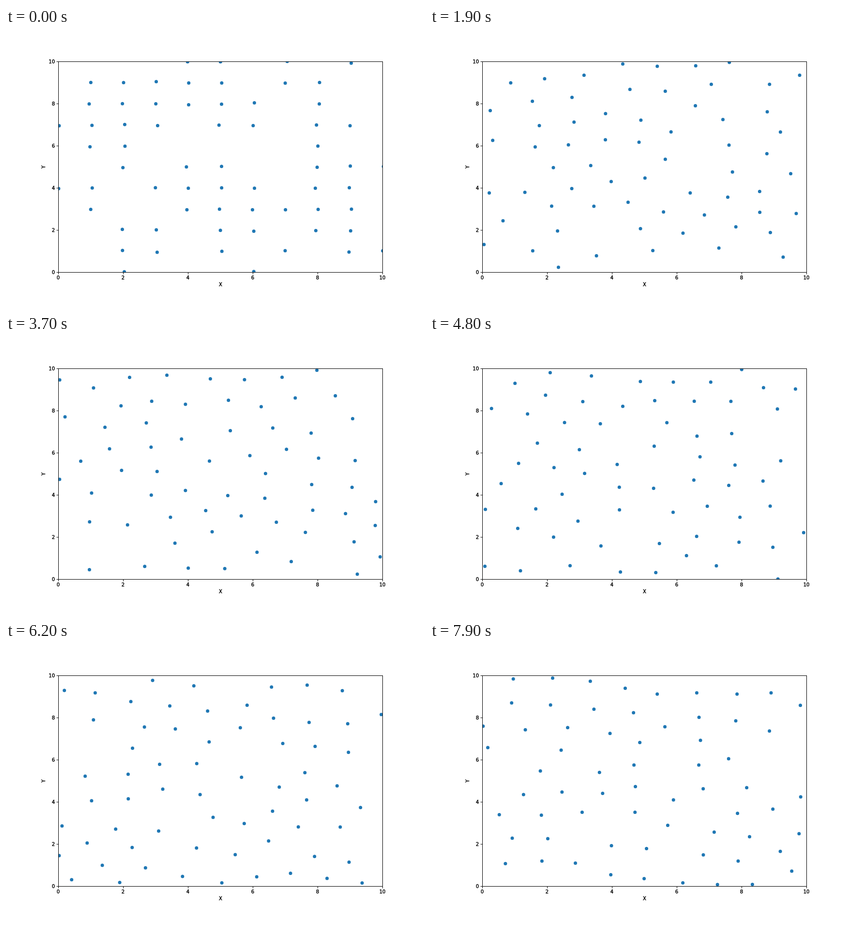
Animation, 864 px wide and 576 px high, one loop 8 s. Source, as an HTML page with a canvas:

```html
<!DOCTYPE html>
<html lang="en">
<head>
<meta charset="utf-8">
<title>Particles in a periodic box</title>
<style>
  html, body { margin: 0; width: 100%; height: 100%; overflow: hidden; background: #fff; }
  canvas { display: block; }
</style>
</head>
<body>
<canvas id="stage" width="864" height="576"></canvas>
<script>
const ctx = document.getElementById('stage').getContext('2d');
const BOX = 10, FRAMES = 80, FRAME_MS = 100, FREE = 7, SUBSTEPS = 8;
const LEFT = 108.5, TOP = 69.5, BOTTOM = 504.5, UNIT_X = 67, UNIT_Y = 43.5;
const STRENGTH = 0.0016, MEAN_SQUARE = 0.003;

const toX = x => LEFT + x * UNIT_X;
const toY = y => BOTTOM - y * UNIT_Y;
const wrap = v => ((v % BOX) + BOX) % BOX;
const nearest = d => d - BOX * Math.round(d / BOX);

// Pixel places after the free flight; each particle left the nearest grid point.
const spread = [
  174,109, 245,111, 315,100, 369,70, 442,70, 383,116, 457,115, 575,117,
  665,110, 723,87, 154,158, 231,154, 310,156, 382,167, 455,161, 527,145,
  662,158, 116,210, 188,205, 259,195, 332,209, 424,202, 512,208, 628,201,
  709,210, 164,253, 262,246, 645,245, 712,275, 787,281, 237,294, 355,285,
  455,279, 636,289, 110,336, 191,329, 305,325, 378,332, 456,327, 528,331,
  614,332, 700,325, 173,377, 361,381, 430,373, 504,381, 578,381, 648,376,
  726,374, 230,407, 316,413, 441,418, 520,428, 620,421, 716,424, 779,455,
  232,450, 326,472, 459,460, 574,453, 696,469, 254,497, 520,494, 599,66
];

const particles = [];
for (let i = 0; i < spread.length; i += 2) {
  const x = (spread[i] - 108) / UNIT_X, y = (504 - spread[i + 1]) / UNIT_Y;
  const homeX = Math.round(x), homeY = Math.round(y);
  const dx = x - homeX, dy = y - homeY;
  particles.push({ x, y, homeX, homeY, dx, dy, vx: dx * 0.1, vy: dy * 0.1 });
}

// Lennard-Jones forces between nearest periodic images
function step(dt) {
  particles.forEach((a, i) => {
    for (let j = 0; j < i; j++) {
      const b = particles[j];
      const dx = nearest(a.x - b.x), dy = nearest(a.y - b.y);
      const r2 = dx * dx + dy * dy;
      if (r2 > 9) continue;
      const s = 1 / Math.max(r2, 0.6) ** 3;
      const push = 24 * STRENGTH * (2 * s * s - s) / r2 * dt;
      a.vx += dx * push; a.vy += dy * push;
      b.vx -= dx * push; b.vy -= dy * push;
    }
  });
  for (const p of particles) {
    p.x += p.vx * dt;
    p.y += p.vy * dt;
  }
}

function holdTemperature() {
  const sum = particles.reduce((s, p) => s + p.vx ** 2 + p.vy ** 2, 0);
  const scale = Math.sqrt(MEAN_SQUARE * particles.length / sum);
  for (const p of particles) {
    p.vx *= scale;
    p.vy *= scale;
  }
}

function pose(frame) {
  if (frame <= FREE) {
    const k = ((frame + 1) / (FREE + 1)) ** 0.85;
    const fold = frame ? wrap : v => v;   // wrapping begins after the first move
    return particles.map(p => [fold(p.homeX + p.dx * k), fold(p.homeY + p.dy * k)]);
  }
  for (let i = 0; i < SUBSTEPS; i++) step(1 / SUBSTEPS);
  holdTemperature();
  return particles.map(p => [wrap(p.x), wrap(p.y)]);
}

const poses = Array.from({ length: FRAMES }, (_, frame) => pose(frame));

function label(text, x, y) {
  ctx.fillText(text, x, y);
  ctx.strokeText(text, x, y);
}

function line(x1, y1, x2, y2) {
  ctx.beginPath();
  ctx.moveTo(x1, y1);
  ctx.lineTo(x2, y2);
  ctx.stroke();
}

function drawAxes() {
  ctx.fillStyle = ctx.strokeStyle = '#000';
  ctx.font = '10px "DejaVu Sans", sans-serif';
  ctx.lineWidth = 1;
  ctx.strokeRect(LEFT, TOP, BOX * UNIT_X, BOX * UNIT_Y);
  for (let n = 0; n <= BOX; n += 2) {
    const x = toX(n), y = Math.floor(toY(n)) + 0.5;
    ctx.lineWidth = 1;
    line(x, BOTTOM, x, BOTTOM + 4);
    line(LEFT, y, LEFT - 4, y);
    ctx.lineWidth = 0.4;
    ctx.textAlign = 'center';
    label(n, x - 0.5, 519);
    ctx.textAlign = 'right';
    label(n, 101, y + 3.5);
  }
  ctx.textAlign = 'center';
  label('X', 443.5, 533);
  ctx.save();
  ctx.translate(81, 287);
  ctx.rotate(-Math.PI / 2);
  label('Y', 0, 0);
  ctx.restore();
}

function draw(now) {
  const frame = Math.floor(now / FRAME_MS) % FRAMES;
  ctx.fillStyle = '#fff';
  ctx.fillRect(0, 0, 864, 576);
  ctx.save();
  ctx.beginPath();
  ctx.rect(LEFT, TOP, BOX * UNIT_X, BOX * UNIT_Y);
  ctx.clip();
  ctx.fillStyle = '#1f77b4';
  for (const [x, y] of poses[frame]) {
    ctx.beginPath();
    ctx.arc(toX(x), toY(y), 3.5, 0, 2 * Math.PI);
    ctx.fill();
  }
  ctx.restore();
  drawAxes();
}

const start = performance.now();
function tick() {
  draw(performance.now() - start);
  requestAnimationFrame(tick);
}
tick();
</script>
</body>
</html>
```
